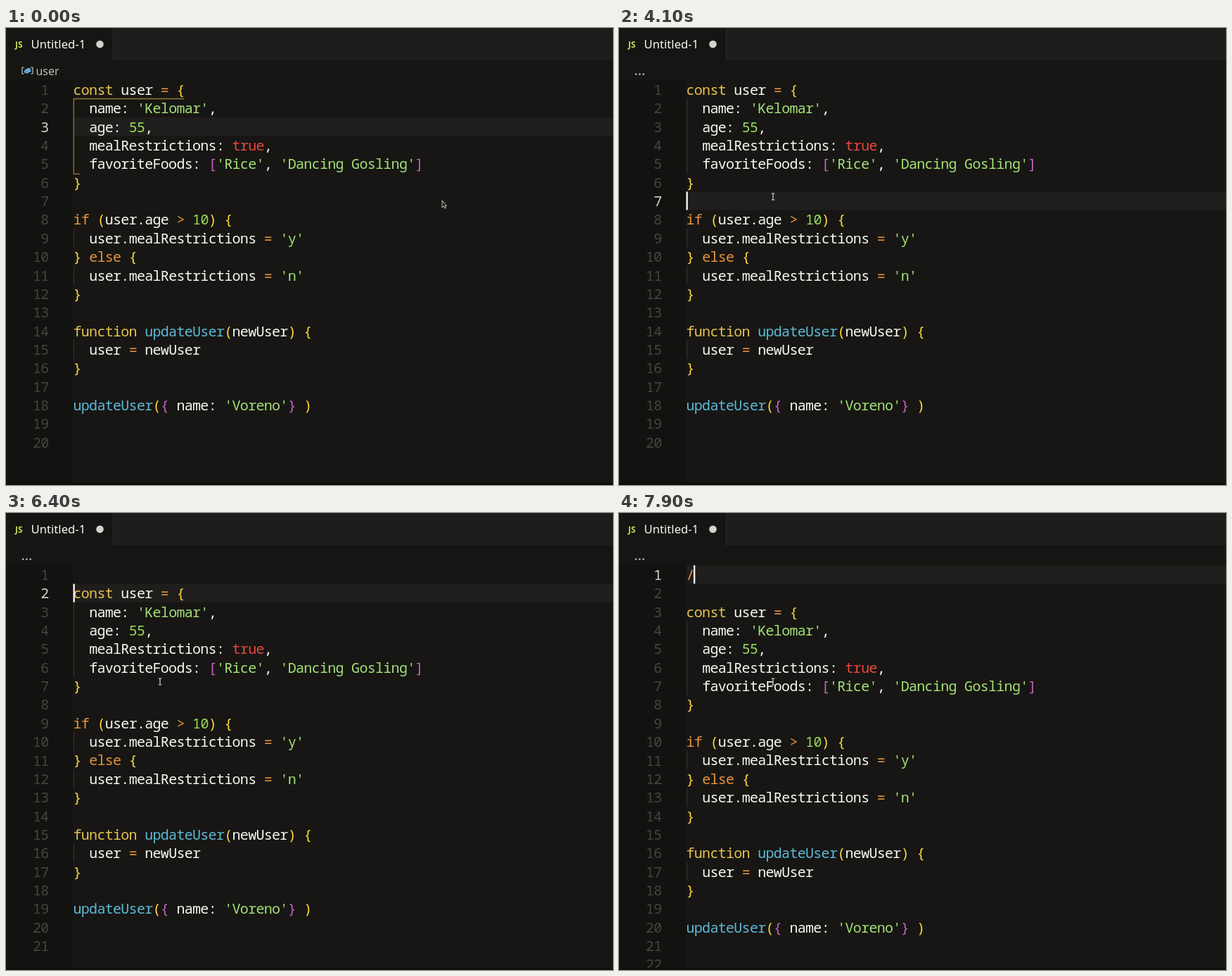
These frames come from a looping animation (863 by 649 pixels, 8000 ms). An HTML page:

```html
<!DOCTYPE html>
<html lang="en">
<head>
<meta charset="utf-8">
<title>Code editor</title>
<style>
  html, body { margin: 0; width: 100%; height: 100%; overflow: hidden; background: #171614; }
  svg { display: block; width: 863px; height: 649px; }
  text { white-space: pre; fill: #f8f7f2; }
  .ui { font: 16.7px "Noto Sans", "Open Sans", sans-serif; }
  .mono text { font: 20px "Noto Sans Mono", "DejaVu Sans Mono", monospace; letter-spacing: -.7px; }
  #numbers text { fill: #454440; text-anchor: end; }
  #numbers .on { fill: #d2d1cc; }
  .str { fill: #a3e276; }
  .decl { fill: #e6c34f; }
  .op { fill: #e6943c; }
  .num { fill: #97dd58; }
  .bool { fill: #e8483d; }
  .fn { fill: #5db9d6; }
  .b0 { fill: #ffd83c; }
  .b1 { fill: #c763c4; }
  .guide { stroke: #34332f; }
  #scope { fill: none; stroke: #8d7a30; stroke-width: 1.3; }
  #match rect { fill: #66491b; stroke: #d2492f; stroke-width: 1.3; }
</style>
</head>
<body>
<svg viewBox="0 0 863 649">
  <rect width="863" height="649" fill="#171614"/>
  <rect y="74" width="95" height="575" fill="#121210"/>
  <rect width="863" height="46" fill="#1e1d1c"/>
  <rect width="152" height="46" fill="#151513"/>
  <rect x="152" width="1" height="46" fill="#2a2927"/>
  <rect y="46" width="863" height="28" fill="#151513"/>

  <g class="ui">
    <text x="13" y="28" style="font-size:12px;font-weight:700;fill:#c9d94e">JS</text>
    <text x="35.5" y="29">Untitled-1</text>
    <circle cx="133.5" cy="23" r="5.3" fill="#d3d2cf"/>
    <g id="crumb">
      <path d="M26 56H23V65H26M35 56H38V65H35" fill="none" stroke="#c5c4c0" stroke-width="1.2"/>
      <path d="M26 60L32 56.500L35.500 58.500V61.500L29.500 65L26 63Z" fill="#6db9ee"/>
      <path d="M26 60L29.500 61.500L35.500 58.500M29.500 61.500V65" fill="none" stroke="#2d5f86" stroke-width=".7"/>
      <text x="42.500" y="66.500" style="font-size:15.9px;fill:#bdbcb8">user</text>
    </g>
    <text id="dots" x="21.500" y="66.500" style="font-size:20px;fill:#bdbcb8">…</text>
  </g>

  <rect id="row" x="97" width="766" height="26.350" fill="#1f1e1c"/>
  <g id="numbers" class="mono"></g>
  <g id="code" class="mono">
    <g id="guides"></g>
    <path id="scope" d="M253 100.500H96.300V207.300H105"/>
    <g id="match">
      <rect x="243.200" y="75.500" width="9.600" height="25"/>
      <rect x="95.800" y="207.800" width="9" height="25"/>
    </g>
  </g>
  <g class="mono"><text id="typed" class="op" x="95.500" y="95" style="fill:#e6943c">/</text></g>
  <rect id="caret" width="2.300" height="26" fill="#fffefa"/>

  <path id="arrow" d="M0 0V10L2.300 8L4 11.300L5.500 10.500L4 7.500H6.500Z" fill="#151513" stroke="#d5d4d0" stroke-width=".9"/>
  <path id="beam" d="M-2.300 -4.500H2.300M0 -4.500V4.500M-2.300 4.500H2.300" fill="none" stroke="#d5d4d0" stroke-width="1.200"/>
  <rect y="646" width="863" height="3" fill="#0d0d0c"/>
</svg>

<script>
const LOOP = 8000, STEP = 100, BLINK = 500;
const LEFT = 95.5, CHAR = 11.3, ROW = 26.35, TOP = 74.3, BASE = 95;

const source = `const user = {
  name: 'Kelomar',
  age: 55,
  mealRestrictions: true,
  favoriteFoods: ['Rice', 'Dancing Gosling']
}

if (user.age > 10) {
  user.mealRestrictions = 'y'
} else {
  user.mealRestrictions = 'n'
}

function updateUser(newUser) {
  user = newUser
}

updateUser({ name: 'Voreno'} )`;

// time, line, column, inserted lines
const caretMoves = [
  [-800, 3, 10, 0], [2100, 7, 0, 0], [5500, 6, 0, 0], [6200, 1, 0, 0],
  [6400, 2, 0, 1], [6800, 3, 0, 2], [7000, 2, 0, 2], [7100, 1, 0, 2], [7900, 1, 1, 2]
];
const crumbShown = [[0, true], [2100, false], [5900, true], [6200, false]];
// time, x, y
const pointerPath = [
  [0, 620, 245], [200, 617, 244], [500, 608, 241], [800, 600, 237], [900, 600, 237],
  [1000, 757, 190], [1100, 600, 139], [1200, 552, 146], [1300, 522, 153], [1400, 507, 158],
  [1600, 507, 158], [1700, 504, 160], [1900, 477, 163], [2100, 310, 232],
  [2200, 265, 236], [2300, 240, 237], [2400, 219, 239.5]
];

const $ = id => document.getElementById(id);

function add(parent, tag, attrs, text = '') {
  const el = document.createElementNS('http://www.w3.org/2000/svg', tag);
  for (const key in attrs) el.setAttribute(key, attrs[key]);
  el.textContent = text;
  return parent.appendChild(el);
}

const kinds = [
  ['str', /^'[^']*'/], ['decl', /^(const|function)\b/], ['op', /^(if\b|else\b|[=>])/],
  ['num', /^\d+/], ['bool', /^true\b/], ['fn', /^updateUser\b/],
  ['open', /^[{([]/], ['close', /^[})\]]/], ['', /^(\w+|.)/]
];
let depth = 0;

function addLine(line, i) {
  const text = add($('code'), 'text', { x: LEFT, y: BASE + i * ROW });
  while (line) {
    const [kind, rule] = kinds.find(([, r]) => r.test(line));
    const part = line.match(rule)[0];
    let name = kind;
    if (kind === 'open') name = 'b' + depth++;
    if (kind === 'close') name = 'b' + --depth;
    add(text, 'tspan', { class: name }, part);
    line = line.slice(part.length);
  }
}

source.split('\n').forEach(addLine);
for (const [first, count] of [[2, 4], [9, 1], [11, 1], [15, 1]]) {
  const y = TOP + (first - 1) * ROW;
  add($('guides'), 'path', { class: 'guide', d: `M96.5 ${y}v${count * ROW}` });
}
const numbers = Array.from({ length: 22 }, (_, i) =>
  add($('numbers'), 'text', { x: 60.5, y: BASE + i * ROW }, i + 1));

const latest = (list, t) => list.filter(item => item[0] <= t).pop();
const show = (el, on) => el.setAttribute('visibility', on ? 'visible' : 'hidden');
const move = (el, x, y) => el.setAttribute('transform', `translate(${x} ${y})`);

function pointerAt(t) {
  const a = latest(pointerPath, t);
  const b = pointerPath[pointerPath.indexOf(a) + 1] || a;
  const k = b === a ? 0 : (t - a[0]) / (b[0] - a[0]);
  return [a[1] + (b[1] - a[1]) * k, a[2] + (b[2] - a[2]) * k];
}

function draw(now) {
  const t = Math.floor(now % LOOP / STEP) * STEP;
  const [since, line, col, shift] = latest(caretMoves, t);
  const y = TOP + (line - 1) * ROW;

  move($('row'), 0, y);
  move($('caret'), LEFT + col * CHAR - (col ? .8 : 0), y);
  show($('caret'), Math.floor((t - since) / BLINK) % 2 === 0);
  move($('code'), 0, shift * ROW);
  show($('scope'), !shift && (line === 3 || line === 6));
  show($('match'), !shift && line === 6);
  show($('typed'), t >= 7900);
  numbers.forEach((el, i) => {
    el.setAttribute('class', i + 1 === line ? 'on' : '');
    show(el, i < 20 + shift);
  });

  const crumb = latest(crumbShown, t)[1];
  show($('crumb'), crumb);
  show($('dots'), !crumb);

  const pos = pointerAt(t);
  move($('arrow'), ...pos);
  move($('beam'), ...pos);
  show($('arrow'), t < 100);
  show($('beam'), t >= 100);
}

function tick() {
  draw(performance.now());
  requestAnimationFrame(tick);
}
tick();
</script>
</body>
</html>
```
